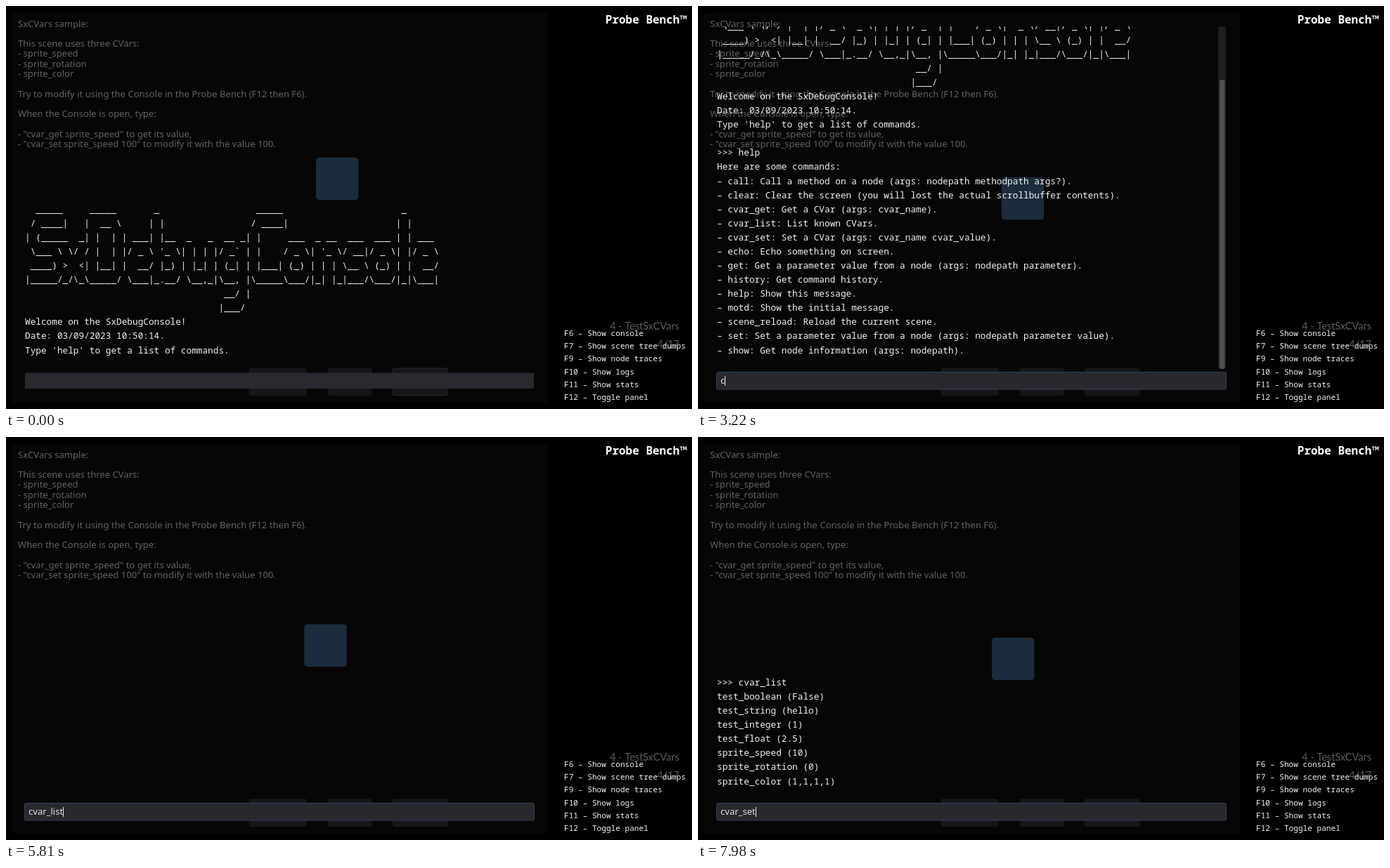
Recreate the animation shown at these times as an HTML page with a canvas. Size 976 by 574 pixels, loop 8000 ms.

```html
<!DOCTYPE html>
<html lang="en">
<head>
<meta charset="utf-8">
<title>Debug console</title>
<style>
  html, body { margin: 0; width: 100%; height: 100%; overflow: hidden; background: #000; }
  canvas { display: block; }
</style>
</head>
<body>
<canvas id="stage" width="976" height="574"></canvas>
<script>
const ctx = document.getElementById("stage").getContext("2d");
const LOOP = 8000, STEP = 70, BLINK = 650;
const SANS = '13.07px "Noto Sans", sans-serif';
const MONO = '"Noto Sans Mono", monospace';
const LABEL = '14.5px Lato, sans-serif';

const sceneText = `SxCVars sample:

This scene uses three CVars:
- sprite_speed
- sprite_rotation
- sprite_color

Try to modify it using the Console in the Probe Bench (F12 then F6).

When the Console is open, type:

- "cvar_get sprite_speed" to get its value,
- "cvar_set sprite_speed 100" to modify it with the value 100.`.split("\n");

const menu = `F6 – Show console
F7 – Show scene tree dumps
F9 – Show node traces
F10 – Show logs
F11 – Show stats
F12 – Toggle panel`.split("\n");

const banner = String.raw`
  _____     _____       _                  _____                      _
 / ____|   |  __ \     | |                / ____|                    | |
| (_____  _| |  | | ___| |__  _   _  __ _| |     ___  _ __  ___  ___ | | ___
 \___ \ \/ / |  | |/ _ \ '_ \| | | |/ _${"`"} | |    / _ \| '_ \/ __|/ _ \| |/ _ \
 ____) >  <| |__| |  __/ |_) | |_| | (_| | |___| (_) | | | \__ \ (_) | |  __/
|_____/_/\_\_____/ \___|_.__/ \__,_|\__, |\_____\___/|_| |_|___/\___/|_|\___|
                                     __/ |
                                    |___/
Welcome on the SxDebugConsole!
Date: 03/09/2023 10:50:14.
Type 'help' to get a list of commands.`.slice(1).split("\n");

const help = `
>>> help
Here are some commands:
– call: Call a method on a node (args: nodepath methodpath args?).
– clear: Clear the screen (you will lost the actual scrollbuffer contents).
– cvar_get: Get a CVar (args: cvar_name).
– cvar_list: List known CVars.
– cvar_set: Set a CVar (args: cvar_name cvar_value).
– echo: Echo something on screen.
– get: Get a parameter value from a node (args: nodepath parameter).
– history: Get command history.
– help: Show this message.
– motd: Show the initial message.
– scene_reload: Reload the current scene.
– set: Set a parameter value from a node (args: nodepath parameter value).
– show: Get node information (args: nodepath).`.split("\n");

const cvars = `>>> cvar_list
test_boolean (False)
test_string (hello)
test_integer (1)
test_float (2.5)
sprite_speed (10)
sprite_rotation (0)
sprite_color (1,1,1,1)`.split("\n");

// Each command: typed text, time of its first key, ms per key, time of Enter, resulting screen.
const FOCUS = 700;
const commands = [
  { text: "help", start: 1260, pace: 110, enter: 1820, screen: [...banner, ...help] },
  { text: "clear", start: 3200, pace: 90, enter: 3780, screen: [] },
  { text: "cvar_list", start: 4970, pace: 100, enter: 5980, screen: cvars },
  { text: "cvar_set", start: 6560, pace: 180, enter: Infinity }
];

function consoleAt(t) {
  let screen = banner, typed = "", lastKey = FOCUS;
  for (const c of commands) {
    if (t >= c.enter) {
      screen = c.screen;
      lastKey = c.enter;
    } else if (t >= c.start) {
      const count = Math.min(c.text.length, Math.floor((t - c.start) / c.pace) + 1);
      typed = c.text.slice(0, count);
      lastKey = c.start + (count - 1) * c.pace;
    }
  }
  const caret = t >= FOCUS && Math.floor((t - lastKey) / BLINK) % 2 === 0;
  return { screen, typed, caret };
}

function box(x, y, w, h, fill, radius = 0, stroke) {
  ctx.beginPath();
  ctx.roundRect(x, y, w, h, radius);
  ctx.fillStyle = fill;
  ctx.fill();
  if (stroke) {
    ctx.strokeStyle = stroke;
    ctx.stroke();
  }
}

function text(str, x, y, font, color, align = "left") {
  ctx.font = font;
  ctx.fillStyle = color;
  ctx.textAlign = align;
  ctx.fillText(str, x, y);
}

function drawScene(t, focused) {
  box(0, 0, 976, 574, "#000");
  box(8, 10, 763, 555, "#060606");
  sceneText.forEach((line, i) => text(line, 17, 29.5 + i * 14.33, SANS, "#626262"));
  box(441 - t * 0.00288, 215.8 + t * 0.00878, 60.5, 60.5, "#1b2d3c", 5);
  for (const [x, w] of [[346, 81], [458, 62], [550.5, 77.5]])
    box(x, 516, w, 38.5, "#161618", 2, !focused && x > 550 ? "#28282c" : "#18181a");
  text("4 - TestSxCVars", 958, 461, LABEL, "#5c5c5c", "right");
  text("4/17", 958, 487, LABEL, "#5c5c5c", "right");
}

function drawConsole(lines) {
  const pitch = 20.08;
  ctx.save();
  ctx.beginPath();
  ctx.rect(27, 29, 724, 488);
  ctx.clip();
  lines.forEach((line, i) =>
    text(line, 27, 494.5 - (lines.length - 1 - i) * pitch, "12.75px " + MONO, "#f4f4f4"));
  ctx.restore();
  if (lines.length > 24) {
    box(740, 29, 11, 488, "#1e1e23", 4);
    box(742, 105, 7.5, 412, "#4e4e54", 3);
  }
}

function drawInput(typed, caret, focused) {
  if (focused) box(26.5, 521.5, 725, 24.5, "#29282f", 2, "#2c435f");
  else box(27, 522.5, 724, 22.5, "#2a2930", 1);
  text(typed, 32, 538, SANS, "#e0e0e0");
  if (caret) box(Math.round(32 + ctx.measureText(typed).width), 527, 1, 14, "#e6e6e6");
}

function draw(now) {
  const t = Math.floor((now % LOOP) / STEP) * STEP;
  const focused = t >= FOCUS;
  const { screen, typed, caret } = consoleAt(t);
  drawScene(t, focused);
  drawConsole(screen);
  drawInput(typed, caret, focused);
  text("Probe Bench™", 968, 25, "bold 16px " + MONO, "#fff", "right");
  menu.forEach((line, i) => text(line, 794, 470 + i * 18.17, "11.1px " + MONO, "#f4f4f4"));
}

const begin = performance.now();
function frame() {
  draw(performance.now() - begin);
  requestAnimationFrame(frame);
}
frame();
</script>
</body>
</html>
```
